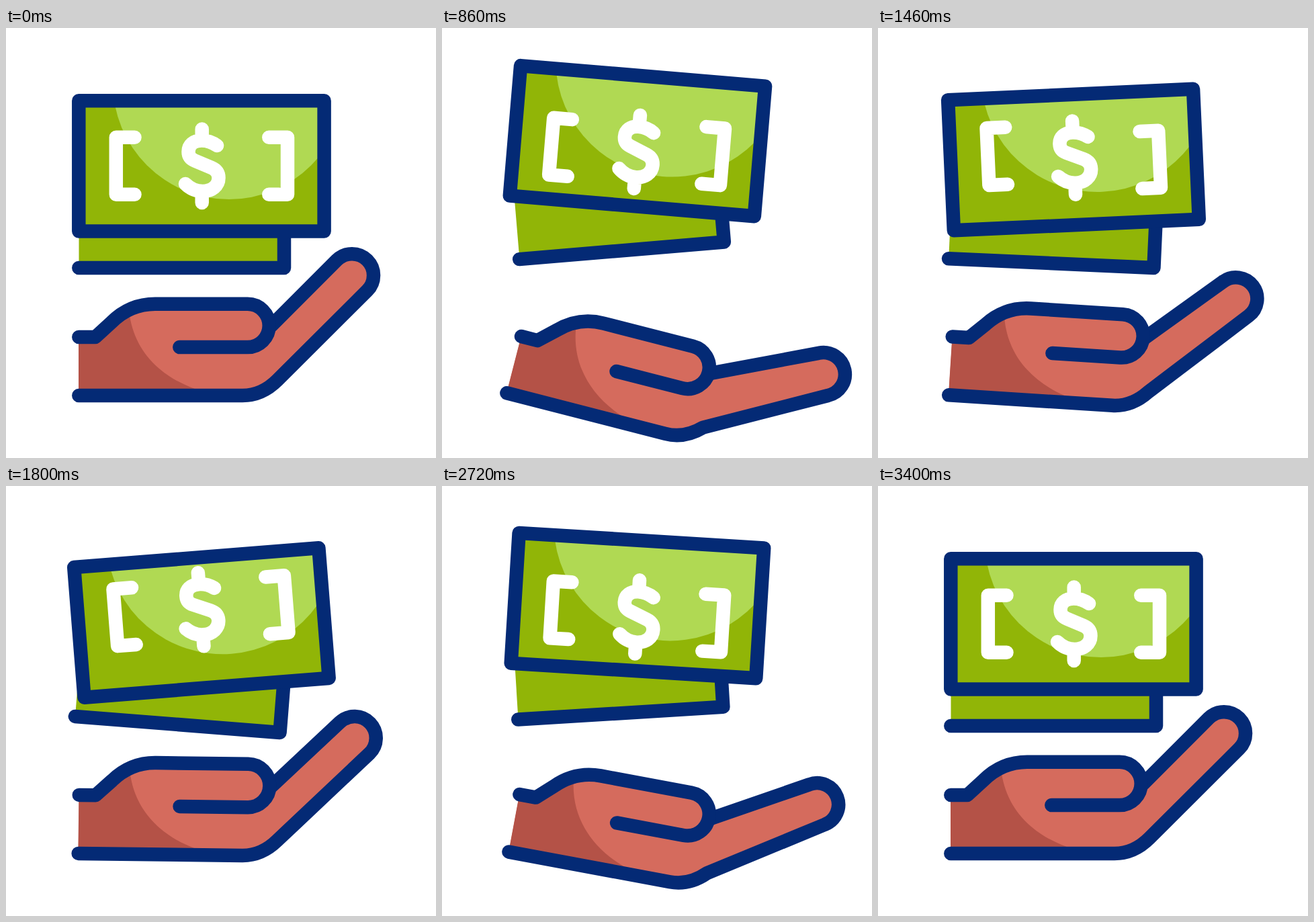
An HTML page that plays this animation: 640x640 px, repeating every 3620 ms.

```html
<!DOCTYPE html>
<html lang="en">
<head>
<meta charset="utf-8">
<title>Hand with banknotes</title>
<style>
  html, body { margin: 0; width: 100%; height: 100%; overflow: hidden; background: #fff; }
  svg { display: block; width: 100vw; height: 100vh; }
  .line { fill: none; stroke: #042a75; stroke-width: 20.5; stroke-linecap: round; stroke-linejoin: round; }
  .ink { stroke: #fff; }
  .green { fill: #91b507; }
  .light { fill: #b0d953; }
  .skin { fill: #d56b5d; }
  .shade { fill: #b45247; }
</style>
</head>
<body>
<svg viewBox="0 0 640 640">
  <clipPath id="face"><path d="M108.3 108.3H473.6V302.5H108.3Z"/></clipPath>

  <g id="backNote">
    <path class="green" d="M108.5 260H414V357H108.5Z"/>
    <path class="line" d="M108.3 357H414V260"/>
  </g>

  <g id="frontNote">
    <path class="green" d="M108.3 108.3H473.6V302.5H108.3Z"/>
    <circle class="light" cx="332" cy="82" r="173" clip-path="url(#face)"/>
    <path class="line" d="M108.3 108.3H473.6V302.5H108.3Z"/>
    <path class="line ink" id="left" d="M191.5 162.8H163.8V247.8H191.5"/>
    <path class="line ink" id="dollar" d="M291.7 150.5V167M291.7 243V260M314 175C307 170 299 167.5 291 167.5
      C279 167.5 271.5 174 271.5 184C271.5 191 275 195 281 197.5L306 208C313 211 316.5 216 316.5 223
      C316.5 235 306 243 293 243C283 243 274 239 267 232"/>
    <path class="line ink" id="right" d="M391.3 162.8H419V247.8H391.3"/>
  </g>

  <g id="hand">
    <path class="skin" id="palm"/>
    <path class="shade" d="M108 460H133L157 438Q168 426 182 418L184 428C192 480 228 518 281 537V547H108Z"/>
    <path class="line" id="finger"/>
    <path class="line" id="thumb"/>
  </g>
</svg>
<script>
const LOOP = 3620, START = 200, SWING = 750, STEP = 20;
const el = id => document.getElementById(id);
const set = (id, name, value) => el(id).setAttribute(name, value);

// Eased value through evenly spaced keys, one per swing.
function follow(keys, time) {
  const last = keys.length - 1;
  const pos = Math.min(Math.max(time / SWING, 0), last);
  const i = Math.min(Math.floor(pos), last - 1), s = pos - i;
  return keys[i] + (keys[i + 1] - keys[i]) * s * s * (3 - 2 * s);
}

const wrist = 'M108.3 460H133L157 438C175 420 198 410.7 222 410.7H359.5';
set('thumb', 'd', wrist + 'A32.2 32.2 0 0 1 359.5 475.1H258.3');

function draw(time) {
  const lift = follow([0, 1, 0, 1, 0], time);
  const sway = lag => follow([0, 1, -1, 1, 0], time - lag);
  const tilt = 5 * sway(0);

  set('frontNote', 'transform', `translate(0 ${-38.8 * lift}) rotate(${tilt} 290.9 205.4)`);
  set('backNote', 'transform', `translate(0 ${-27 * lift}) rotate(${-tilt} 267 281)`);
  ['left', 'dollar', 'right'].forEach((id, i) =>
    set(id, 'transform', `translate(0 ${19.6 * sway(100 * i)})`));

  // The index finger straightens while the whole hand tips down.
  const tip = `L${492.3 + 53 * lift} ${345.6 + 29.5 * lift}`
    + `A1 1 0 0 1 ${537.7 + 36 * lift} ${390.8 + 42.5 * lift}`;
  const finger = tip + 'L404 524C389 539 371 547 352 547H108.3';
  set('finger', 'd', 'M395 443' + finger);
  set('palm', 'd', wrist + 'A32.2 32.2 0 0 1 391.7 442.9L395 443' + finger + 'Z');
  set('hand', 'transform', `rotate(${15 * lift} 117 498)`);
}

function tick() {
  const now = performance.now() % LOOP;
  draw(Math.floor(now / STEP) * STEP - START);
  requestAnimationFrame(tick);
}
tick();
</script>
</body>
</html>
```
